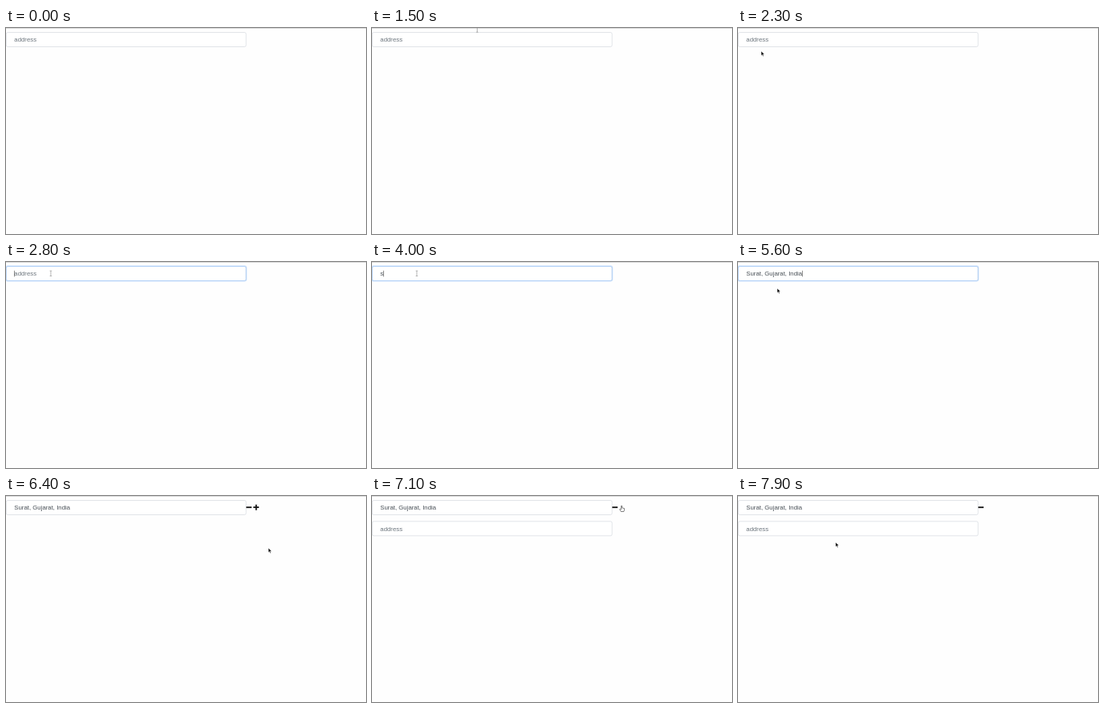
Recreate the animation shown at these times as an HTML page. Size 450 by 258 pixels, loop 8 s.

```html
<!DOCTYPE html>
<html lang="en">
<head>
<meta charset="utf-8">
<title>Address field</title>
<style>
  html, body { margin: 0; width: 100%; height: 100%; overflow: hidden; background: #fefefe; }
  svg { display: block; width: 100%; height: 100%; }
  text { font-family: "Liberation Sans", Arial, sans-serif; font-size: 7.8px; fill: #495057; white-space: pre; }
  .hint { fill: #6c757d; }
  .main { font-size: 6.4px; fill: #111; }
  .match { font-weight: bold; }
  .region { font-size: 5.4px; fill: #999; }
  .credit { font-size: 6.8px; fill: #777; }
  .field { fill: #fff; stroke: #ced4da; stroke-width: .6; }
  .rule { stroke: #e6e6e6; stroke-width: .5; }
  .icon { stroke: #111; stroke-width: 1.8; fill: none; }
</style>
</head>
<body>
<svg viewBox="0 0 450 258" preserveAspectRatio="none">
  <defs>
    <filter id="soft" x="-5%" y="-5%" width="110%" height="115%">
      <feGaussianBlur stdDeviation=".8"/>
    </filter>
  </defs>
  <rect width="450" height="258" fill="#fefefe"/>
  <rect width="450" height="1" fill="#dadada"/>

  <rect id="glow" x="-1" y="4.3" width="302.2" height="20.2" rx="3" fill="#d3e6fe"/>
  <rect class="field" x=".3" y="5.5" width="299.8" height="18" rx="2"/>
  <rect id="ring" x=".3" y="5.5" width="299.8" height="18" rx="2" fill="none" stroke="#a9cefc" stroke-width=".8"/>
  <text id="value" x="10.3" y="17.2"></text>
  <rect id="caret" y="10.8" width=".6" height="7.6" fill="#444"/>

  <g id="second">
    <rect class="field" x=".3" y="31.8" width="299.8" height="18" rx="2"/>
    <text class="hint" x="10.3" y="43.5">address</text>
  </g>
  <path id="minus" class="icon" d="M300.3 14.2H307"/>
  <path id="plus" class="icon" d="M309.2 14.2H316.2M312.7 10.7V17.7"/>

  <g id="list">
    <rect y="25" width="299.5" height="85" fill="#000" opacity=".3" filter="url(#soft)"/>
    <rect y="24.5" width="299.5" height="85.2" fill="#fff"/>
    <rect id="hover" width="299.5" height="15.3" fill="#fafafa"/>
    <g id="rows"></g>
    <text class="credit" x="240" y="107.2">powered by</text>
    <circle cx="287" cy="104.8" r="3.6" fill="#4285f4"/>
  </g>

  <g id="cursor">
    <path id="arrow" d="M0 0V5.6L1.3 4.4L2.2 6.5L3.2 6.1L2.3 4.1H4.1Z" fill="#000" stroke="#fff" stroke-width=".5"/>
    <path id="beam" d="M-1.3 -3.2H1.3M0 -3.2V3.2M-1.3 3.2H1.3" fill="none" stroke="#888" stroke-width=".6"/>
    <path id="hand" d="M-.6 0Q0 -.7 .6 0V2.4L3.4 3V5.4L2.7 7H-.7L-2.4 4.2Q-2 3.3 -.6 4.3Z" fill="#fff" stroke="#000" stroke-width=".5"/>
  </g>
</svg>
<script>
const LOOP = 8000, STEP = 100, TOP = 24.5, ROW = 15.33, BLINK = 600;
const FOCUS = 2700, TYPE = 3900, OPEN = 4400, PICK = 5600, BLUR = 5900, ICONS = 6100, ADD = 7100;

const $ = id => document.getElementById(id);
const between = (t, a, b) => t >= a && t < b;
const clamp = v => Math.max(0, Math.min(1, v));
const ease = k => k * k * (3 - 2 * k);
const mix = (a, b, k) => a + (b - a) * k;
const show = (id, on) => $(id).setAttribute('display', on ? 'inline' : 'none');

const places = [
  ['Surat', 'Gujarat, India'],
  ['Salem', 'Tamil Nadu, India'],
  ['Siliguri', 'West Bengal, India'],
  ['Solapur', 'Maharashtra, India'],
  ['Saharanpur', 'Uttar Pradesh, India']
];

$('rows').innerHTML = places.map(([city, region], i) => `
  <g transform="translate(0 ${TOP + i * ROW})">
    <path class="rule" d="M0 .2H299.5"/>
    <path d="M5.8 10.6L5.3 8.1A2.1 2.1 0 1 1 6.3 8.1Z" fill="#aaa"/>
    <circle cx="5.8" cy="6.1" r=".75" fill="#fff"/>
    <text class="main" x="12.6" y="9.8"><tspan class="match">${city[0]}</tspan>${city.slice(1)}<tspan class="region" dx="1.4">${region}</tspan></text>
  </g>`).join('');

// Pointer glides: each starts where the last ended unless "from" is given; "bend" curves it
const glides = [
  { start: 500, end: 700, from: [202, 13], to: [16, -9] },
  { start: 1500, end: 2100, from: [131.5, 2], to: [29, 29], bend: [75, 128] },
  { start: 2300, end: 2600, to: [56, 14.3] },
  { start: 4700, end: 5000, to: [51, 48] },
  { start: 5200, end: 5500, to: [49, 33] },
  { start: PICK, end: 6000, to: [228, 148] },
  { start: 6000, end: 6800, to: [312, 12.5], bend: [386, 50] },
  { start: ADD, end: 7900, to: [122, 58], bend: [512, 285] }
];
glides.forEach((g, i) => {
  g.from = g.from || glides[i - 1].to;
  g.bend = g.bend || g.from.map((v, axis) => mix(v, g.to[axis], .5));
});

function pointer(t) {
  const g = glides.filter(g => g.start <= t).pop();
  if (!g) return [-20, -20];
  const k = ease(clamp((t - g.start) / (g.end - g.start)));
  return g.from.map((v, i) => mix(mix(v, g.bend[i], k), mix(g.bend[i], g.to[i], k), k));
}

function shapeAt(x, y) {
  if (y > TOP) return 'arrow';
  if (x < 301) return 'beam';
  return x < 317 ? 'hand' : 'arrow';
}

function render(t) {
  const [x, y] = pointer(t), shape = shapeAt(x, y);
  $('cursor').setAttribute('transform', `translate(${x} ${y})`);
  for (const s of ['arrow', 'beam', 'hand']) show(s, s === shape);

  const focus = clamp((t - FOCUS + 50) / 150) - clamp((t - BLUR + 50) / 150);
  $('glow').setAttribute('opacity', focus);
  $('ring').setAttribute('opacity', focus);

  const typed = t >= TYPE, picked = t >= PICK, value = $('value');
  value.textContent = picked ? places[0].join(', ') : typed ? 's' : 'address';
  value.setAttribute('class', typed ? '' : 'hint');

  // The blink restarts one step after the key press
  const blinkStart = typed ? TYPE + STEP : FOCUS;
  const lit = Math.floor((t - blinkStart) / BLINK) % 2 === 0;
  const width = picked ? value.getComputedTextLength() : typed ? 3.9 : -.3;
  $('caret').setAttribute('x', 10.3 + width);
  show('caret', lit && between(t, FOCUS, BLUR));

  const row = Math.floor((y - TOP) / ROW);
  show('list', between(t, OPEN, PICK));
  show('hover', row >= 0);
  $('hover').setAttribute('y', TOP + row * ROW);

  show('minus', t >= ICONS);
  show('plus', between(t, ICONS, ADD));
  show('second', t >= ADD);
}

const start = performance.now();
function tick() {
  const t = (performance.now() - start) % LOOP;
  render(Math.floor(t / STEP) * STEP);
  requestAnimationFrame(tick);
}
tick();
</script>
</body>
</html>
```
